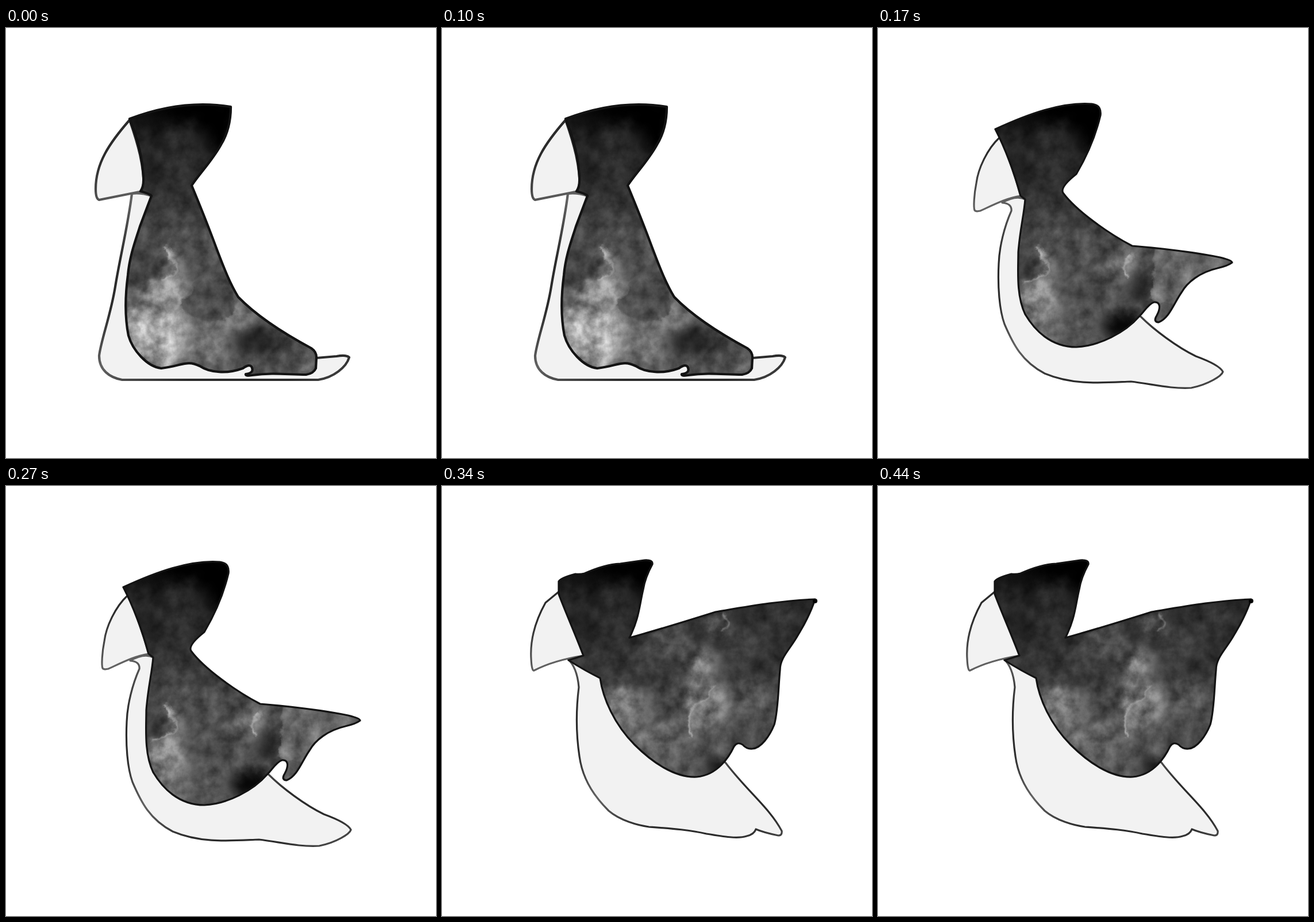
An HTML page for the animation above (0.51 s loop, 748 by 748 pixels).

```html
<!DOCTYPE html>
<html lang="en">
<head>
<meta charset="utf-8">
<title>Bird</title>
<style>
html, body { margin: 0; width: 100%; height: 100%; overflow: hidden; background: #fff; }
svg { position: absolute; left: 0; top: 0; width: 100vw; height: 100vh; opacity: 0; will-change: opacity; }
</style>
</head>
<body>
<script>
const HOLD = 170;

// Soft patches of paint: x, y, rx, ry, grey
const head = [
  [330, 148, 75, 24, 0], [372, 180, 26, 38, 0], [262, 160, 28, 14, 12],
  [238, 188, 20, 18, 36], [300, 212, 40, 36, 44], [318, 182, 14, 20, 38],
  [255, 240, 18, 16, 26], [275, 195, 14, 14, 28], [322, 245, 18, 20, 46]
];

const poses = [
  {
    line: 4.2,
    beak: 'M215 160C180 200 156 235 156 280Q156 297 162 299L232 285L240 286C241 240 229 200 215 160Z',
    belly: 'M219 288C212 345 198 400 190 450C182 500 166 540 162 570C162 595 180 608 202 612H543C570 608 592 590 597 573Q592 568 575 571L540 574L400 520L253 292Q235 286 219 288Z',
    coat: 'M215 158C270 137 330 127 391 137C391 165 385 185 374 203C358 232 335 255 323 274C340 315 352 345 366 383C380 420 390 445 404 468C440 505 490 535 531 557Q540 563 540 573L539 592Q535 601 522 603C490 603 465 599 428 604Q416 606 417 602Q433 600 427 589Q423 584 412 592C385 602 355 600 337 588C315 577 308 587 270 592C245 589 220 560 213 535C206 500 208 460 212 430C215 395 227 365 233 345L253 292Q250 288 234 284Q240 275 239 260C237 220 226 185 215 158Z',
    paint: [
      [242, 410, 32, 50, 66], [345, 420, 42, 60, 76], [285, 462, 42, 32, 150],
      [300, 415, 16, 28, 118], [232, 525, 32, 38, 168], [280, 538, 52, 48, 172],
      [350, 555, 42, 40, 116], [404, 502, 34, 24, 120], [445, 543, 46, 26, 36],
      [405, 580, 34, 16, 84], [500, 570, 30, 22, 72], [525, 584, 16, 14, 100]
    ],
    stain: 'M303 485Q330 510 355 517Q388 508 402 482Q370 430 335 440Q318 455 303 485Z',
    wisp: 'M278 378Q300 392 286 405Q304 412 294 428L270 443'
  },
  {
    line: 3.2,
    beak: 'M212 190C190 210 174 245 171 270C167 290 166 312 168 317Q170 320 178 318C200 308 225 295 248 292C238 255 226 222 212 190Z',
    belly: 'M216 304Q233 305 232 318C220 345 211 380 210 410C208 450 211 490 220 515C235 550 250 580 290 601C340 622 390 617 440 615C480 620 510 628 545 626C575 620 598 605 600 598Q594 586 553 571C520 555 480 525 457 502L300 450L256 298Q240 290 216 304Z',
    coat: 'M204 176C260 150 320 128 372 132Q389 134 387 152C378 190 362 225 345 254Q316 277 322 287C345 318 400 357 442 379C490 383 540 388 595 399Q616 404 616 408Q608 414 590 418C560 425 538 442 528 460C515 478 507 505 488 512Q478 511 485 500C493 485 490 476 480 477C470 480 462 495 455 501C430 530 385 553 345 555C300 555 272 525 256 498C240 465 244 420 244 390C247 350 254 325 256 298L248 292C238 255 224 215 204 176Z',
    paint: [
      [262, 410, 24, 36, 62], [350, 440, 50, 70, 76], [284, 476, 36, 38, 142],
      [300, 418, 14, 26, 118], [300, 525, 30, 28, 108], [372, 520, 36, 30, 84],
      [438, 408, 28, 28, 112], [462, 450, 24, 34, 44], [428, 518, 36, 26, 6]
    ],
    stain: 'M480 380L478 478H530L620 420V380Z',
    stainGrey: 104,
    wisp: 'M278 378Q300 392 286 405Q304 412 294 428L258 446M445 395L428 415L440 432'
  },
  {
    line: 3.2,
    beak: 'M203 184L180 203C165 230 153 265 155 300Q156 322 160 321C185 308 215 300 246 295C232 258 216 220 203 184Z',
    belly: 'M218 300Q235 315 238 350C233 390 233 430 239 470C245 515 270 545 290 565C310 582 340 590 360 593C400 596 430 598 460 605C490 610 515 614 530 609Q543 606 546 597Q560 603 585 608Q592 608 591 600C570 560 530 530 493 481L300 380L275 334Z',
    coat: 'M203 166Q206 160 232 153Q240 154 248 152C270 142 290 136 310 135L352 129Q367 128 366 136Q353 160 350 180C343 210 343 230 326 264C370 252 425 235 476 219C530 210 590 199 649 197Q640 225 620 258C605 285 588 298 588 320C585 350 585 390 578 415C570 435 555 456 540 457Q530 458 523 450Q514 444 508 453C500 470 480 503 443 506C405 508 365 480 335 450C300 415 280 370 275 334Q250 322 220 303L246 295C232 258 215 220 203 188Z',
    paint: [
      [300, 315, 45, 24, 52], [380, 310, 50, 40, 62], [320, 388, 38, 34, 124],
      [375, 450, 48, 34, 104], [410, 268, 34, 20, 88], [460, 310, 26, 26, 122],
      [465, 380, 42, 42, 122], [485, 238, 26, 14, 100], [530, 275, 36, 30, 64],
      [590, 225, 40, 24, 54], [565, 310, 32, 26, 46], [545, 375, 30, 32, 88],
      [545, 435, 34, 20, 64], [440, 470, 30, 24, 84], [488, 490, 26, 20, 18]
    ],
    wisp: 'M475 345Q462 366 440 384Q425 410 440 434M485 225Q510 240 482 252',
    dots: '<circle cx="649" cy="200" r="4"/>'
  }
];

const grey = v => `rgb(${v},${v},${v})`;
const blob = ([x, y, rx, ry, v]) =>
  `<ellipse cx="${x}" cy="${y}" rx="${rx}" ry="${ry}" fill="${grey(v)}"/>`;

function draw(p, i) {
  const area = 'filterUnits="userSpaceOnUse" x="0" y="0" width="748" height="748" color-interpolation-filters="sRGB"';
  return `<svg viewBox="0 0 748 748"><defs>
    <linearGradient id="wash${i}" gradientUnits="userSpaceOnUse" x1="0" y1="130" x2="0" y2="430">
      <stop stop-color="#080808"/><stop offset=".25" stop-color="#242424"/>
      <stop offset=".5" stop-color="#303030"/><stop offset=".75" stop-color="#484848"/>
      <stop offset="1" stop-color="#525252"/>
    </linearGradient>
    <linearGradient id="ink${i}" gradientUnits="userSpaceOnUse" spreadMethod="reflect" x1="0" y1="0" x2="50" y2="110">
      <stop offset=".3" stop-color="#2b2b2b"/><stop offset="1" stop-color="#626262"/>
    </linearGradient>
    <clipPath id="coat${i}"><path d="${p.coat}"/></clipPath>
    <filter id="soft${i}" ${area}><feGaussianBlur stdDeviation="11"/></filter>
    <filter id="edge${i}" ${area}><feGaussianBlur stdDeviation="1.5"/></filter>
    <filter id="paper${i}" ${area}>
      <feTurbulence type="fractalNoise" baseFrequency=".04" numOctaves="5" seed="4" result="noise"/>
      <feDisplacementMap in="SourceGraphic" in2="noise" scale="22" xChannelSelector="R" yChannelSelector="G" result="bent"/>
      <feColorMatrix in="noise" values="1 0 0 0 0 1 0 0 0 0 1 0 0 0 0 0 0 0 0 1" result="grain"/>
      <feComposite in="bent" in2="grain" operator="arithmetic" k1="1.1" k2=".45"/>
    </filter></defs>
    <g fill="#f2f2f2" stroke="url(#ink${i})" stroke-width="${p.line}" stroke-linejoin="round">
      <path d="${p.belly}"/><path d="${p.beak}"/>
    </g>
    <g clip-path="url(#coat${i})"><g filter="url(#paper${i})">
      <rect width="748" height="748" fill="url(#wash${i})"/>
      <g filter="url(#soft${i})">${[...head, ...p.paint].map(blob).join('')}</g>
      <g filter="url(#edge${i})">
        <path d="${p.stain || ''}" fill="${grey(p.stainGrey || 76)}" opacity=".85"/>
        <path d="${p.wisp}" fill="none" stroke="#aaa" stroke-width="5" opacity=".6"/>
      </g>
    </g></g>
    <path d="${p.coat}" fill="none" stroke="#131313" stroke-width="${p.line}" stroke-linejoin="round"/>
    ${p.dots || ''}</svg>`;
}

document.body.innerHTML = poses.map(draw).join('');
const layers = [...document.querySelectorAll('svg')];

function tick() {
  const now = Math.floor(performance.now() / HOLD) % poses.length;
  layers.forEach((layer, i) => layer.style.opacity = i === now ? 1 : 0);
  requestAnimationFrame(tick);
}
tick();
</script>
</body>
</html>
```
